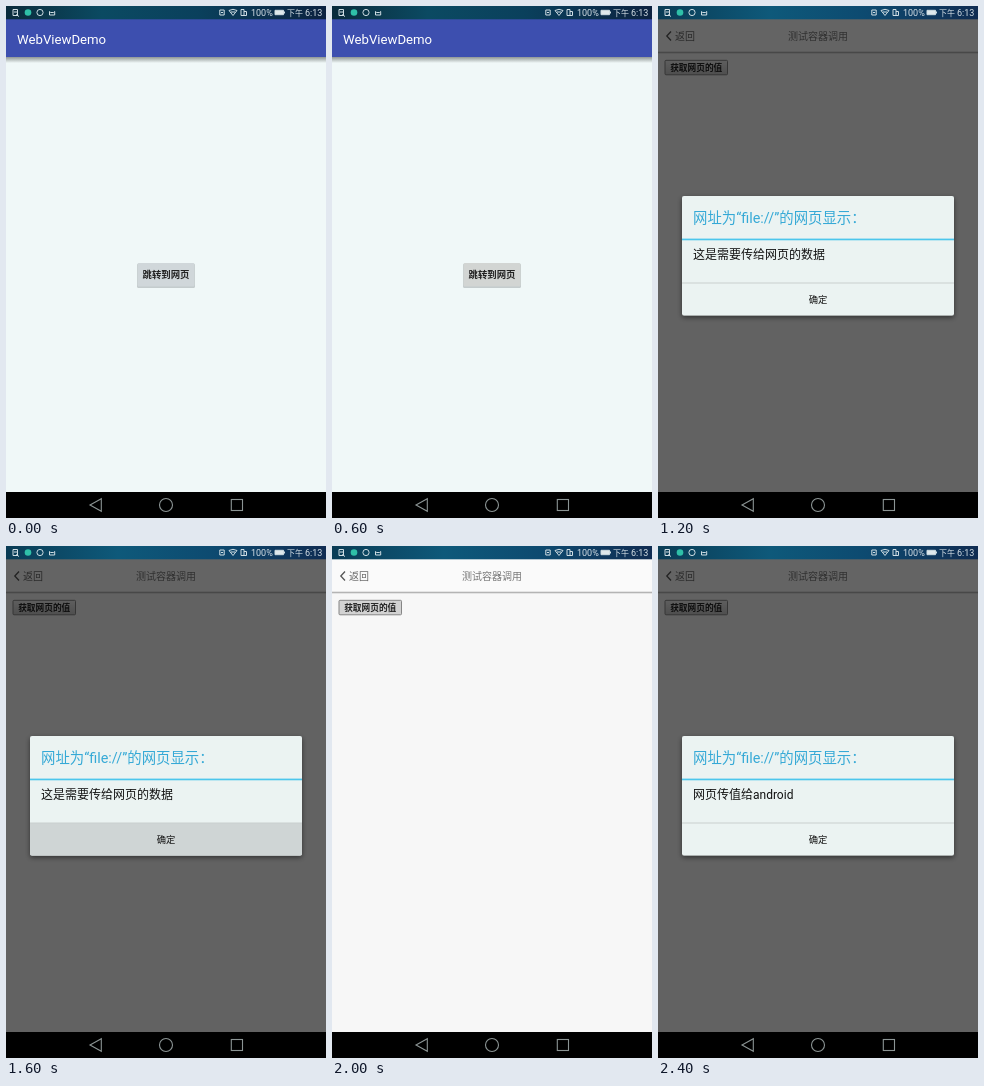
An HTML page that plays this animation: 320 px wide and 512 px high, repeating every 2.6 s.

```html
<!DOCTYPE html>
<html lang="zh-CN">
<head>
<meta charset="utf-8">
<style>
html, body { margin: 0; width: 100%; height: 100%; overflow: hidden; background: #000; }
svg { display: block; width: 100vw; height: 100vh; }
text { font-family: Roboto, "Noto Sans CJK SC", "Noto Sans CJK", sans-serif; }
.bold { font-weight: 700; }
.mid { text-anchor: middle; }
.icons { fill: none; stroke: #cfdde3; }
</style>
</head>
<body>
<svg viewBox="0 0 320 512">
  <defs>
    <linearGradient id="bar">
      <stop offset="0" stop-color="#0a2b3b"/>
      <stop offset=".3" stop-color="#0b4a62"/>
      <stop offset=".6" stop-color="#0a405c"/>
      <stop offset="1" stop-color="#0c2240"/>
    </linearGradient>
    <linearGradient id="webBar">
      <stop offset="0" stop-color="#0a3c55"/>
      <stop offset=".35" stop-color="#0e597a"/>
      <stop offset=".65" stop-color="#0d4a70"/>
      <stop offset="1" stop-color="#102c52"/>
    </linearGradient>
    <linearGradient id="shade" x2="0" y2="1">
      <stop offset="0" stop-color="#8f9695"/>
      <stop offset="1" stop-color="#f0f8f8"/>
    </linearGradient>
    <linearGradient id="key" x2="0" y2="1">
      <stop offset="0" stop-color="#ededed"/>
      <stop offset="1" stop-color="#c4c4c4"/>
    </linearGradient>
    <filter id="glow" x="-10%" y="-10%" width="120%" height="125%">
      <feDropShadow dx="0" dy="2" stdDeviation="2.5" flood-opacity=".5"/>
    </filter>
  </defs>

  <g id="home">
    <rect y="13" width="320" height="473" fill="#f0f8f8"/>
    <rect y="51" width="320" height="6" fill="url(#shade)"/>
    <rect y="13" width="320" height="38" fill="#3d4faf"/>
    <text x="11" y="38" font-size="13.2" fill="#fff">WebViewDemo</text>
    <rect x="131" y="257.5" width="58" height="24.5" rx="1.5" fill="#b3babb" opacity=".7"/>
    <rect id="jump" x="131.5" y="257" width="57" height="23.5" rx="1.5"/>
    <text class="bold mid" x="160" y="272.3" font-size="9.4" fill="#222">跳转到网页</text>
  </g>

  <g id="web">
    <rect y="13" width="320" height="473" fill="#f7f7f7"/>
    <rect y="13" width="320" height="33" fill="#fafafa"/>
    <rect y="45.7" width="320" height="1.6" fill="#b4b4b4"/>
    <path d="M13 25.5 8.8 30l4.2 4.5" fill="none" stroke="#555" stroke-width="1.3"/>
    <text x="17" y="34" font-size="10" fill="#666">返回</text>
    <text class="mid" x="160" y="34" font-size="10" fill="#777">测试容器调用</text>
    <rect id="fetch" x="7" y="54.3" width="62.5" height="14.5" rx="1" stroke="#858585"/>
    <text class="bold mid" x="38.2" y="64.8" font-size="8.7" fill="#222">获取网页的值</text>
    <rect id="dim" y="13" width="320" height="473"/>
  </g>

  <g id="dialog">
    <rect id="panel" x="24" y="190" width="272" height="119.5" rx="2" filter="url(#glow)"/>
    <path id="press" d="M24 277h272v30.5a2 2 0 0 1-2 2H26a2 2 0 0 1-2-2z"/>
    <text id="caption" x="35" y="217" font-size="14.4">网址为“file://”的网页显示：</text>
    <rect id="rule" x="24" y="232.6" width="272" height="1.7"/>
    <text id="message" x="35" y="252.6" font-size="12" fill="#111"></text>
    <rect x="24" y="276.5" width="272" height="1" fill="#c9d0d0"/>
    <text class="mid" x="160" y="296.8" font-size="9.3" fill="#111">确定</text>
  </g>

  <rect id="status" width="320" height="13.3"/>
  <g class="icons">
    <path d="M7 3.5h4.5v6H7zM8 6h3M10 8.5l3 2"/>
    <circle cx="22" cy="6.5" r="3.3" fill="#2fc0a8" stroke="none"/>
    <circle cx="34" cy="6.5" r="3.1"/>
    <path d="M43.5 9V5.5l1.2 1h2.8l1.2-1V9z"/>
    <path d="M213.8 4h4.4v5h-4.4zM215 6.5h2"/>
    <path d="M223 4.5q4-2.4 8 0l-4 5zM225 6h4"/>
    <path d="M235 3.5h3v6h-3zM238 5.5h2.5v4H238"/>
    <path d="M269 4.3h8.5v4.4H269z" fill="#dfe8ec"/>
    <path d="M278.5 5.5v2"/>
  </g>
  <g fill="#d8e2e8">
    <text x="245" y="10.4" font-size="9">100%</text>
    <text x="281" y="10.2" font-size="8">下午</text>
    <text x="299" y="10.4" font-size="9">6:13</text>
  </g>

  <rect y="486" width="320" height="26" fill="#000"/>
  <g fill="none" stroke="#8b9494" stroke-width="1.1">
    <path d="M95.3 492.8v12.4L84 499z"/>
    <circle cx="160" cy="499" r="6.5"/>
    <rect x="225.3" y="493.5" width="11.2" height="11"/>
  </g>
</svg>
<script>
const el = id => document.getElementById(id);
const set = (id, attrs) => {
  for (const name in attrs) el(id).setAttribute(name, attrs[name]);
};
const show = (id, on) => set(id, { display: on ? "inline" : "none" });

function draw(t) {
  const home = t < 800;
  const first = t >= 1200 && t < 2000;
  const second = t >= 2400;
  const open = first || second;
  const pressed = t >= 1600 && t < 2000;
  const closing = t >= 1800 && t < 2000;

  show("home", home);
  show("web", !home);
  show("dialog", open);
  set("status", { fill: home ? "url(#bar)" : "url(#webBar)" });
  set("jump", { fill: t < 600 ? "#d0d7da" : "#d2d5d3" });
  set("fetch", { fill: t >= 2000 && t < 2400 ? "#d2d2d2" : "url(#key)" });
  set("dim", { opacity: closing ? .54 : open ? .6 : 0 });
  set("dialog", {
    transform: `translate(160 249.8) scale(${closing ? .967 : 1}) translate(-160 -249.8)`
  });
  set("panel", { fill: closing ? "#cdd2d2" : "#ebf3f2" });
  set("press", { fill: closing ? "#bcbebe" : "#cfd5d5", opacity: pressed ? 1 : 0 });
  set("caption", { fill: closing ? "#3596bd" : "#35a9d6" });
  set("rule", { fill: closing ? "#4f9cbd" : "#4cc6ec" });
  el("message").textContent = second ? "网页传值给android" : "这是需要传给网页的数据";
}

const start = performance.now();
function tick() {
  draw((performance.now() - start) % 2600);
  requestAnimationFrame(tick);
}
tick();
</script>
</body>
</html>
```
